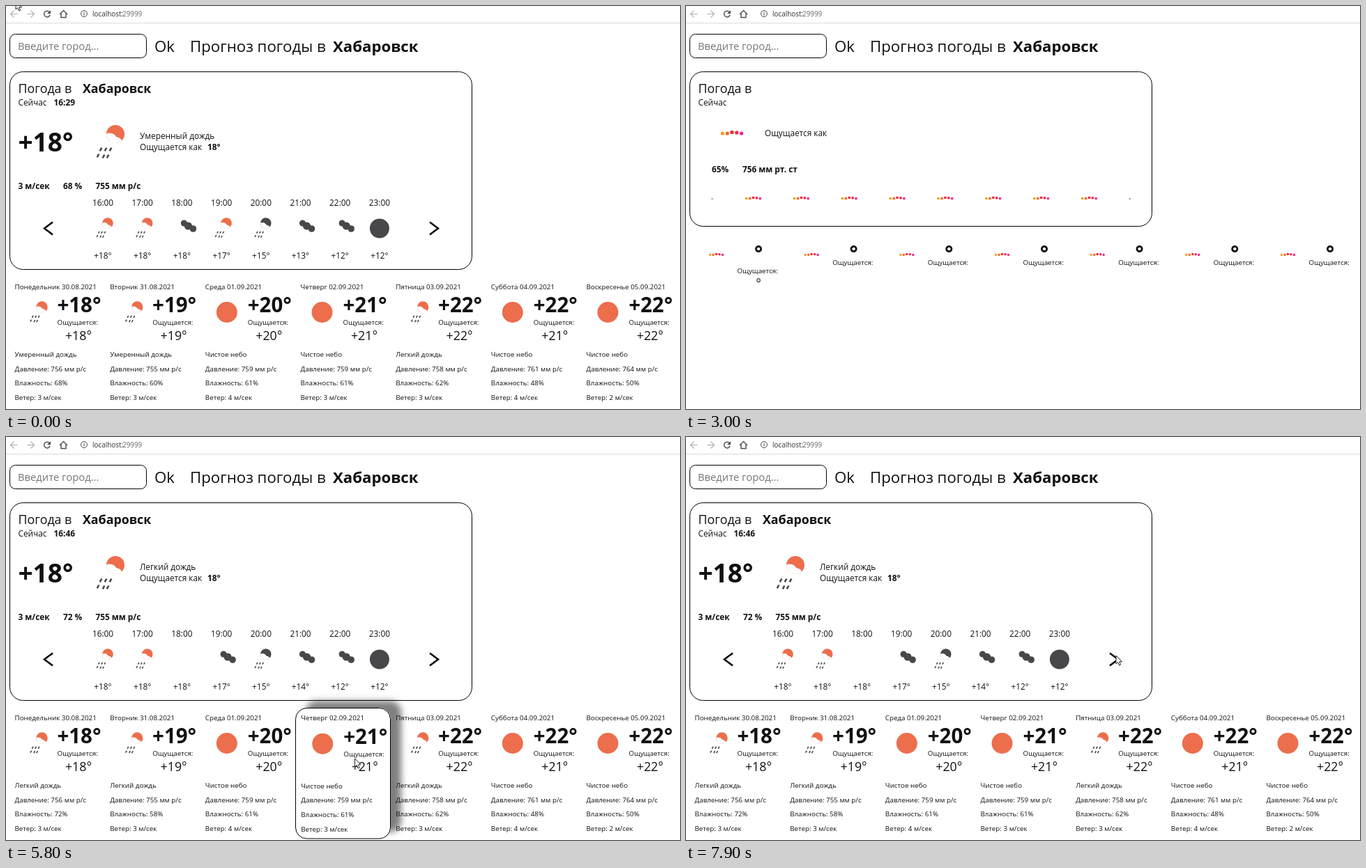
These frames come from a looping animation (967 px wide and 579 px high, 8000 ms). An HTML page with a canvas:

```html
<!DOCTYPE html>
<html lang="ru">
<head>
<meta charset="utf-8">
<title>Прогноз погоды</title>
<style>
  html, body { margin: 0; width: 100%; height: 100%; overflow: hidden; background: #fff; }
  canvas { display: block; }
</style>
</head>
<body>
<canvas id="stage" width="967" height="579"></canvas>
<script>
const ctx = document.getElementById('stage').getContext('2d');
const LOOP = 8000, RELOAD = 950, LOADING = 1600, LOADED = 3250;
const ORANGE = '#ec6e4c', DARK = '#48484a', INK = '#111';
const SMALL = 9.8, BASE = 11.84, MEDIUM = 17.8, TITLE = 22.2;
const PITCH = 136.67, CARD_TOP = 389.5, CARD_W = 136, CARD_H = 187.5;

// Weather before and after the reload
const before = {
  time: '16:29', sky: 'Умеренный дождь', humidity: 68,
  icons: ['rain', 'rain', 'clouds', 'rain', 'nightRain', 'clouds', 'clouds', 'night'],
  temps: [18, 18, 18, 17, 15, 13, 12, 12], dayHumidity: [68, 60]
};
const after = {
  time: '16:46', sky: 'Легкий дождь', humidity: 72,
  icons: ['rain', 'rain', '', 'clouds', 'nightRain', 'clouds', 'clouds', 'night'],
  temps: [18, 18, 18, 17, 15, 14, 12, 12], dayHumidity: [72, 58]
};
// name, temperature, feels like, sky, pressure, humidity, wind
const days = [
  ['Понедельник 30.08', 18, 18, '', 756, 0, 3],
  ['Вторник 31.08', 19, 19, '', 755, 0, 3],
  ['Среда 01.09', 20, 20, 'Чистое небо', 759, 61, 4],
  ['Четверг 02.09', 21, 21, 'Чистое небо', 759, 61, 3],
  ['Пятница 03.09', 22, 22, 'Легкий дождь', 758, 62, 3],
  ['Суббота 04.09', 22, 21, 'Чистое небо', 761, 48, 4],
  ['Воскресенье 05.09', 22, 22, 'Чистое небо', 764, 50, 2]
];
// time, x, y, visible until the next key
const pointerPath = [
  [0, 14, -7, 1], [100, 14, -7, 1], [600, 58, 10, 1], [1000, 58, 11, 1], [1200, 84, 73, 1],
  [1500, 150, 120, 1], [2000, 318, 113, 1], [2100, 321, 110, 1], [2250, 321, 110, 1],
  [2700, 330, 57, 0], [4100, 320, 56, 1], [4700, 90, 400, 1], [5000, 65, 466, 1],
  [5250, 65, 466, 1], [5800, 500, 462, 1], [5900, 548, 460, 1], [6000, 600, 460, 1],
  [6150, 640, 460, 1], [6300, 850, 470, 0], [6400, 880, 500, 0], [6800, 880, 490, 1],
  [7000, 770, 450, 1], [7300, 650, 395, 1], [7700, 617, 314, 1], [8000, 617, 314, 1]
];

function text(str, x, y, size, { bold = false, align = 'left', color = INK } = {}) {
  ctx.font = `${bold ? 700 : 400} ${size}px "Open Sans", sans-serif`;
  ctx.textAlign = align;
  ctx.fillStyle = color;
  ctx.fillText(str, x, y);
}

function disc(x, y, r, color) {
  ctx.fillStyle = color;
  ctx.beginPath();
  ctx.arc(x, y, r, 0, Math.PI * 2);
  ctx.fill();
}

function line(points, width, color) {
  ctx.strokeStyle = color;
  ctx.lineWidth = width;
  ctx.beginPath();
  points.forEach(([x, y]) => ctx.lineTo(x, y));
  ctx.stroke();
}

function box(x, y, w, h, r) {
  ctx.beginPath();
  ctx.roundRect(x, y, w, h, r);
  ctx.strokeStyle = '#000';
  ctx.lineWidth = 1;
  ctx.stroke();
}

function rain(x, y, scale, color) {
  ctx.save();
  ctx.translate(x, y);
  ctx.scale(scale, scale);
  ctx.beginPath();
  ctx.arc(0, 0, 13, 0, Math.PI * 2);
  ctx.clip();
  disc(0, 0, 14, color);
  disc(-8, 9, 10.5, '#fff');
  disc(1, 13, 9, '#fff');
  ctx.restore();
  ctx.save();
  ctx.translate(x - 16 * scale, y + 27 * scale);
  ctx.scale(scale, scale);
  for (const [dx, dy] of [[-5, -5], [2, -5], [9, -5], [-9, 4], [-1, 5], [5, 5]])
    line([[dx + 1.3, dy - 2.3], [dx - 1.3, dy + 2.3]], 2.6, DARK);
  ctx.restore();
}

function clouds(x, y) {
  disc(x - 6, y - 4, 4.6, DARK);
  disc(x + 7, y + 4, 4.8, DARK);
  disc(x, y, 5.6, DARK);
}

function hourIcon(kind, x) {
  if (kind === 'rain') rain(x + 7, 312, 0.6, ORANGE);
  if (kind === 'nightRain') rain(x + 7, 312, 0.6, DARK);
  if (kind === 'clouds') clouds(x + 9, 316);
  if (kind === 'night') disc(x, 319.5, 14, DARK);
}

function loader(x, y, scale, t) {
  for (let i = 0; i < 5; i++) {
    const lift = Math.max(0, Math.sin(t / 1000 * Math.PI * 2 + 3.94 - i)) ** 3;
    const color = `hsl(${(34 - i * 16 + 360) % 360} 95% ${55 + i % 2}%)`;
    disc(x + (i - 2) * 6.8 * scale, y - lift * 2 * scale, 2.6 * scale, color);
  }
}

function toolbar(t) {
  const busy = t >= RELOAD && t < LOADING;
  const pale = '#b4b4b4', gray = '#4a4d51';
  for (const [x, s] of [[11.5, -1], [35.5, 1]]) {
    line([[x - 5 * s, 11.5], [x + 5 * s, 11.5]], 1.2, pale);
    line([[x, 6.5], [x + 5 * s, 11.5], [x, 16.5]], 1.2, pale);
  }
  if (t >= 550 && t < 1350) disc(59, 11, 10.5, '#e3e4e6');
  if (busy) {
    line([[55, 7], [63, 15]], 1.4, gray);
    line([[63, 7], [55, 15]], 1.4, gray);
  } else {
    ctx.strokeStyle = gray;
    ctx.lineWidth = 1.5;
    ctx.beginPath();
    ctx.arc(59, 11.5, 4.3, 0.3, Math.PI * 1.75);
    ctx.stroke();
    ctx.fillStyle = gray;
    ctx.beginPath();
    ctx.moveTo(64, 6); ctx.lineTo(64, 11); ctx.lineTo(59, 11);
    ctx.fill();
  }
  line([[77, 12], [82.5, 6.5], [88, 12]], 1.4, gray);
  line([[79, 10.5], [79, 16.5], [86, 16.5], [86, 10.5]], 1.4, gray);
  ctx.lineWidth = 1;
  ctx.beginPath();
  ctx.arc(112, 11, 4.5, 0, Math.PI * 2);
  ctx.stroke();
  line([[112, 10.3], [112, 13.5]], 1.1, gray);
  line([[112, 8.2], [112, 9.4]], 1.1, gray);
  text('localhost:', 124, 15, 9.9, { color: '#333' });
  text('29999', 167, 15, 9.9, { color: '#666' });
  ctx.fillStyle = '#dcdcdc';
  ctx.fillRect(0, 24, 967, 1);
}

function header() {
  box(5.5, 40.5, 196, 34, 8);
  text('Введите город...', 17, 63, 14.8, { color: '#757575' });
  text('Ok', 213, 66, TITLE);
  text('Прогноз погоды в', 264, 66, TITLE);
  text('Хабаровск', 469, 66, TITLE, { bold: true });
}

// Both side arrows, mirrored around the panel's middle
function chevron(x, alpha) {
  const shape = [[x + 13, 310.5], [x + 1, 319.5], [x + 13, 328.5]];
  ctx.globalAlpha = alpha;
  line(shape, 2.5, '#000');
  line(shape.map(([px, py]) => [675 - px, py]), 2.5, '#000');
  ctx.globalAlpha = 1;
}

function chevrons(t) {
  const start = [200, 4600, 6800].find(s => t >= s && t < s + 850);
  if (start === undefined) return chevron(54, 1);
  const p = t - start;
  if (p < 550) {
    const out = Math.min(1, p / 420);
    chevron(54 - 21 * out, 1 - 0.9 * out);
  }
  if (p > 250) {
    const k = Math.min(1, (p - 250) / 350);
    const x = 78 - 24 * k;
    const trail = Math.min(1, (850 - p) / 350);
    chevron(x + 15, 0.15 * trail);
    chevron(x + 8, 0.35 * trail);
    chevron(x, Math.min(1, k * 1.4));
  }
}

function panel(data, t) {
  box(5.5, 94.5, 663, 284, 19);
  text('Погода в', 17.5, 125, MEDIUM);
  text('Хабаровск', 110, 125, MEDIUM, { bold: true });
  text('Сейчас', 17.5, 143, BASE);
  text(data.time, 68.5, 143, BASE, { bold: true });
  text('+18°', 17.5, 209, 37, { bold: true });
  rain(157, 184, 1, ORANGE);
  text(data.sky, 192, 191, BASE);
  text('Ощущается как', 192, 207, BASE);
  text('18°', 289, 207, BASE, { bold: true });
  text('3 м/сек', 17.5, 263, BASE, { bold: true });
  text(data.humidity + ' %', 82, 263, BASE, { bold: true });
  text('755 мм р/с', 128.5, 263, BASE, { bold: true });
  data.icons.forEach((icon, i) => {
    const x = 139 + i * 56.7;
    text(`${16 + i}:00`, x, 287, BASE, { align: 'center' });
    hourIcon(icon, x);
    text(`+${data.temps[i]}°`, x, 363, BASE, { align: 'center' });
  });
  chevrons(t);
}

function dayCard(data, i, hovered) {
  const [name, temp, feels, sky, pressure, humidity, wind] = days[i];
  const left = i * PITCH;
  const shift = hovered ? 0.75 : 0;
  if (hovered) {
    ctx.save();
    Object.assign(ctx, { shadowColor: 'rgba(0,0,0,.5)', shadowBlur: 10,
      shadowOffsetX: 15, shadowOffsetY: -10, fillStyle: '#fff' });
    ctx.beginPath();
    ctx.roundRect(left + 5, CARD_TOP - 0.5, CARD_W + 1, CARD_H + 1, 16);
    ctx.fill();
    ctx.restore();
    box(Math.round(left) + 5.5, CARD_TOP, CARD_W, CARD_H, 16);
  }
  ctx.save();
  ctx.translate(left + shift, shift);
  text(name + '.2021', 12.5, 406.5, SMALL);
  if (sky === 'Чистое небо') disc(43.5, 440, 15, ORANGE);
  else rain(51.5, 432.5, 0.63, ORANGE);
  text(`+${temp}°`, 105, 440, 29.5, { bold: true, align: 'center' });
  text('Ощущается:', 73.5, 458, SMALL);
  text(`+${feels}°`, 104, 479.5, MEDIUM, { align: 'center' });
  text(sky || data.sky, 12.5, 504, SMALL);
  text(`Давление: ${pressure} мм р/с`, 12.5, 524.5, SMALL);
  text(`Влажность: ${humidity || data.dayHumidity[i]}%`, 12.5, 545, SMALL);
  text(`Ветер: ${wind} м/сек`, 12.5, 566, SMALL);
  ctx.restore();
}

function loadingPage(t) {
  box(5.5, 94.5, 663, 222, 19);
  text('Погода в', 17.5, 125, MEDIUM);
  text('Сейчас', 17.5, 143, BASE);
  loader(66, 183, 1, t);
  text('Ощущается как', 113, 187, BASE);
  text('65%', 37, 239, BASE, { bold: true });
  text('756 мм рт. ст', 81, 239, BASE, { bold: true });
  disc(37.5, 277, 1.2, '#999');
  disc(637, 277, 1.2, '#999');
  for (let i = 0; i < 8; i++) loader(96.5 + i * 68.85, 276.5, 0.72, t);
  days.forEach((_, i) => {
    const left = i * PITCH;
    loader(43.5 + left, 357.5, 0.66, t);
    text('°', 104 + left, 366, 29.5, { bold: true, align: 'center' });
    text('Ощущается:', 73.5 + left, i ? 372 : 383.5, SMALL);
  });
  text('°', 104, 405, MEDIUM, { align: 'center' });
}

function pointerAt(t) {
  const next = pointerPath.findIndex(key => key[0] > t);
  const [t0, x0, y0, visible] = pointerPath[next - 1];
  const [t1, x1, y1] = pointerPath[next];
  const k = (t - t0) / (t1 - t0);
  return { x: x0 + (x1 - x0) * k, y: y0 + (y1 - y0) * k, visible };
}

function drawPointer({ x, y }) {
  ctx.beginPath();
  for (const [dx, dy] of [[0, 0], [0, 12], [2.7, 9.6], [4.6, 14], [6.6, 13.1], [4.8, 8.8], [8.5, 8.8]])
    ctx.lineTo(x + dx, y + dy);
  ctx.closePath();
  ctx.fillStyle = '#fff';
  ctx.fill();
  ctx.strokeStyle = '#222';
  ctx.lineWidth = 1;
  ctx.stroke();
}

function draw(t) {
  ctx.fillStyle = '#fff';
  ctx.fillRect(0, 0, 967, 579);
  toolbar(t);
  header();
  const pointer = pointerAt(t);
  if (t >= LOADING && t < LOADED) {
    loadingPage(t);
  } else {
    const data = t < LOADING ? before : after;
    const hovered = pointer.y >= CARD_TOP ? Math.floor((pointer.x - 5) / PITCH) : -1;
    panel(data, t);
    days.forEach((_, i) => dayCard(data, i, i === hovered));
  }
  if (pointer.visible) drawPointer(pointer);
}

const started = performance.now();
function tick() {
  draw((performance.now() - started) % LOOP);
  requestAnimationFrame(tick);
}
tick();
</script>
</body>
</html>
```
